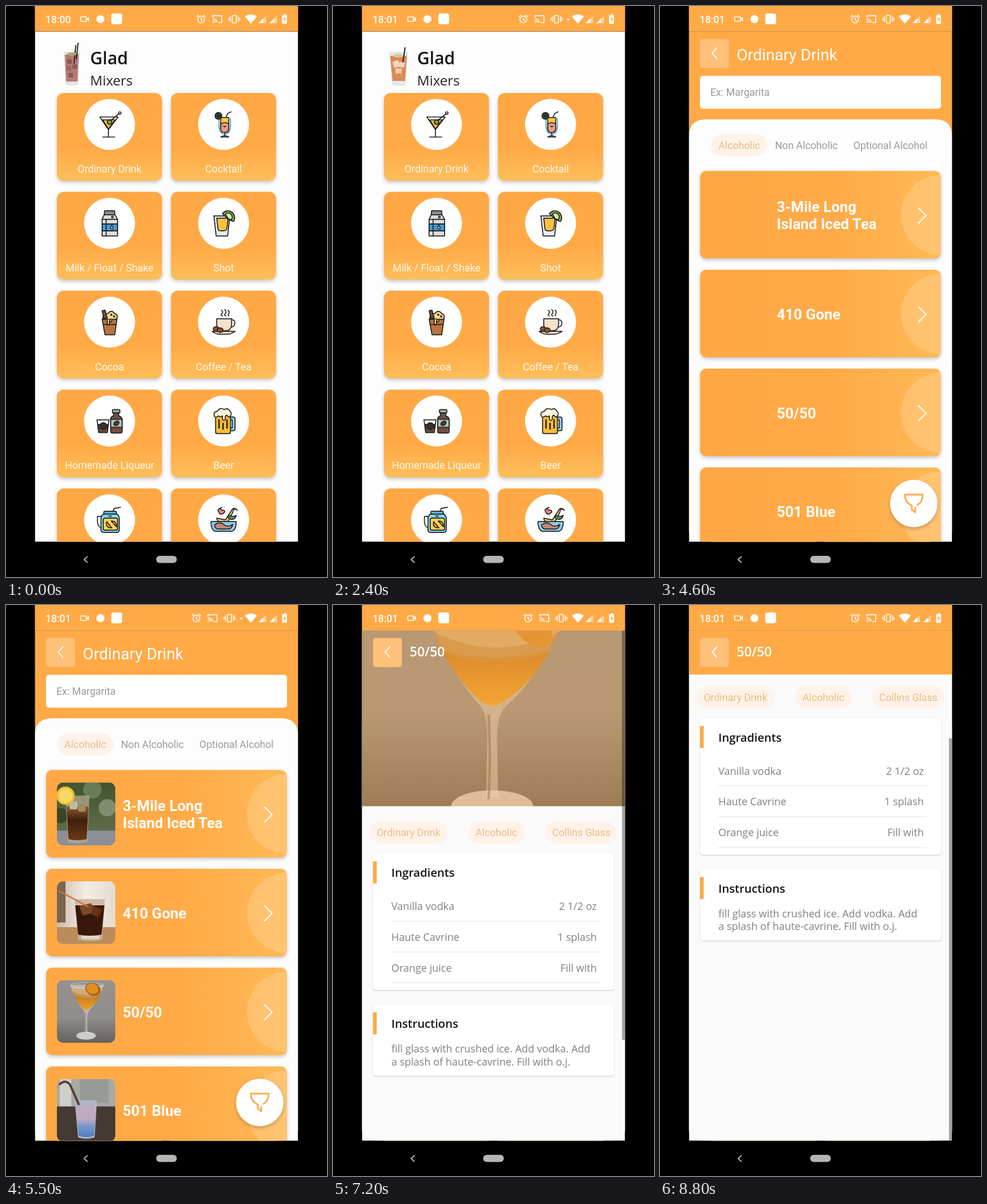
An HTML page for the animation above (9 s loop, 561x998 px).

```html
<!DOCTYPE html>
<html lang="en">
<head>
<meta charset="utf-8">
<title>Drinks app</title>
<style>
html, body { margin: 0; width: 100%; height: 100%; overflow: hidden; background: #000; }
svg { display: block; }
text { font-family: Roboto, sans-serif; font-size: 17.7px; white-space: pre; }
.soft text { font-family: "Open Sans", sans-serif; }
.soft .plain text { font-family: Roboto, sans-serif; }
.lift { filter: drop-shadow(0 3px 3px rgba(0,0,0,.22)); }
.flat { filter: drop-shadow(0 1px 1px rgba(0,0,0,.2)); }
.icon { stroke: #222; stroke-width: 1.7; stroke-linejoin: round; stroke-linecap: round; }
</style>
</head>
<body>
<svg id="stage" width="561" height="998" viewBox="0 0 561 998"></svg>
<script>
const ORANGE = '#ffaa47';
const LEFT = 50.5, TOP = 44.5, WIDE = 460, TALL = 892;
const $ = id => document.getElementById(id);

const rect = (x, y, w, h, fill, r = 0, more = '') =>
  `<rect x="${x}" y="${y}" width="${w}" height="${h}" rx="${r}" fill="${fill}" ${more}/>`;
const page = (fill, more) => rect(LEFT, TOP, WIDE, TALL, fill, 0, more);
const circle = (x, y, r, fill, more = '') =>
  `<circle cx="${x}" cy="${y}" r="${r}" fill="${fill}" ${more}/>`;
const oval = (x, y, rx, ry, fill, more = '') =>
  `<ellipse cx="${x}" cy="${y}" rx="${rx}" ry="${ry}" fill="${fill}" ${more}/>`;
const path = (d, fill = 'none', more = '') => `<path d="${d}" fill="${fill}" ${more}/>`;
const line = (d, color, w = 2) =>
  path(d, 'none', `stroke="${color}" stroke-width="${w}" stroke-linecap="round" stroke-linejoin="round"`);
const text = (x, y, s, fill, size = 17.7, more = '') =>
  `<text x="${x}" y="${y}" fill="${fill}" style="font-size:${size}px" ${more}>${s}</text>`;
const group = (id, body, more = '') => `<g id="${id}" ${more}>${body}</g>`;
const at = (x, y, body, more = '') => `<g transform="translate(${x} ${y})" ${more}>${body}</g>`;
const MID = 'text-anchor="middle"', END = 'text-anchor="end"', SEMI = 'font-weight="600"';

// Category icons, each centred on its disc
const icons = {
  'Ordinary Drink':
    path('M-17-13H15L-2 9Z', '#fff') + path('M-12-8H10L-2 8Z', '#fcc23c') +
    path('M-2 9V21M-12 22H9M-3-3L17-19') + circle(0, -4, 4, '#7d9b3c') + circle(18, -20, 2, '#fff'),
  'Cocktail':
    path('M-5-12H9V7Q9 14 2 14T-5 7Z', '#ffc83f') + path('M-5-1Q2-5 9-1V7Q9 14 2 14T-5 7Z', '#f09a83') +
    path('M9-10H12V6Q10 17 2 17T-8 6V-10H-5', 'none', 'stroke="#4f9fc0"') +
    path('M2 15V20M-5 22Q2 17 9 22Z', '#72c7ec') + path('M4-12L7-19L13-22') +
    circle(-9, -15, 6, '#39463a') + path('M-13-15H-5M-9-19V-11') + path('M0 3Q2 5 4 3'),
  'Milk / Float / Shake':
    path('M-13-7L-9-16H9L14-7V22H-13Z', '#dcdcdc') + rect(-9, -22, 18, 7, '#8c8c8c', 1) +
    rect(-13, 1, 27, 12, '#3f9ad6') + path('M-13-7H14M-6-7V22M-13 1H14M-13 13H14') +
    path('M4 3Q0 9 4 10T4 3', '#fff') + circle(5, -11, 1.5, '#fff'),
  'Shot':
    path('M-17-13H11L7 22H-13Z', '#e3eef8') + path('M-12-9H8L6 8Q5 13 0 13H-6Q-10 13-10 8Z', '#ffc13d') +
    path('M-2-17A11 11 0 0 1 17-3L8-7Z', '#7da94b') + path('M3-16A7 7 0 0 1 13-6L8-8Z', '#d8e89b'),
  'Cocoa':
    path('M-12-4Q-12-16-3-15Q3-23 9-15Q16-13 12-4Z', '#f9d486') +
    path('M-13-5H13L9 22H-8Z', '#b9743f') + path('M-4-5V4Q-1 7 0 2V-3Q2 2 4-3', '#f9d486') +
    path('M-10-6L-13-20L-8-21L-4-7Z', '#714b35') + path('M-11 4H11') +
    circle(3, -13, 1, '#222') + circle(8, -10, 1, '#222'),
  'Coffee / Tea':
    path('M12-4H16Q21-3 19 5Q17 9 10 9') + path('M-12-6H14V5Q12 15 5 15H-4Q-11 13-12 5Z', '#f5e0c9') +
    path('M-20 16H20Q13 21 7 21H-8Q-15 20-20 16Z', '#f5e0c9') +
    oval(-13, 12, 5, 4, '#94552e') + oval(-6, 14, 5, 4, '#94552e') +
    path('M-4-21Q0-18-3-15T-2-11M2-22Q6-18 3-15T4-11M8-21Q11-18 9-15T9-11'),
  'Homemade Liqueur':
    path('M-22-2H-1L-4 20H-19Z', '#fff') + path('M-20 6H-3L-4 20H-19Z', '#754c43') +
    circle(-11, 9, 6, '#39302e') + rect(5, -20, 13, 6, '#92b49f', 2) +
    path('M7-14V-9Q1-7 2-2V18Q2 21 5 21H18Q22 21 22 18V-2Q22-7 16-9V-14Z', '#754c43') +
    rect(2, -3, 20, 14, '#a9c8b4') + oval(12, 4, 5, 3.4, '#5b3a2a', 'transform="rotate(-35 12 4)"'),
  'Beer':
    path('M11-7H17Q20-7 20-3V13Q20 17 16 17H11V12H15V-2H11Z', '#84cef0') +
    path('M-14-10H12V19Q12 22 9 22H-11Q-14 22-14 19Z', '#fdbb38') +
    path('M-16-8Q-19-16-11-17Q-6-25 1-20Q8-24 11-17Q16-13 11-8Q10-5 8-8Q5-12 3-8V-3Q0 1-2-3V-9Q-6-6-9-9Q-14-5-16-8Z', '#fff3db') +
    path('M-8-2V12M-1 4V14M6-2V12', 'none', 'stroke-width="2.5"'),
  'Jar':
    path('M-15-6H-21Q-23 12-14 14') + path('M-11-10H13Q17-7 17-2V18Q16 22 12 22H-10Q-14 22-15 18V-2Q-15-7-11-10Z', '#83d2ef') +
    rect(-10, -15, 22, 5, '#5bb6de', 2) + path('M6-15L8-20L19-22') + rect(-11, -3, 25, 21, '#ffd256', 3) +
    path('M-5 3Q-8 14 4 14L-5 3M3 2Q13 2 12 12L3 2', '#f2a738') + path('M-1-7Q1-5 3-7'),
  'Punch':
    path('M-10-17Q-7-22-3-17Q2-18 2-14Q-3-8-7-11Z', '#ec8580') + path('M-7-20L-3-22', '#70a254') +
    path('M22-18Q17-21 16-13L6 6H-3Q-12 3-12-3L3 0L13-15Q17-24 24-17Z', '#f3c770') +
    path('M9-8Q18-4 22-8Q20 0 13-1T9-8Z', '#4d9f68') +
    path('M-22 3H22Q22 20 12 20H-12Q-22 20-22 3Z', '#88cfea') + path('M-16 9Q-7 2 0 8T16 8Q14 16 8 16H-9Q-15 16-16 9Z', '#c98678')
};

const homeCard = (name, i) => {
  const label = i > 7 ? '' : text(92, 139, name, '#fff8ee', 17.8, MID);
  return at(89 + i % 2 * 199.3, 152 + (i >> 1) * 172.8,
    rect(0, 0, 183.7, 153.5, 'url(#down)', 12, 'class="lift"') +
    circle(92, 55, 44.6, '#fff') + at(92, 55, icons[name], 'class="icon"') + label);
};

const logos = [
  path('M101 80L104 137Q115 141 126 137L129 80Z', '#e7e3e3') + path('M103 85L105 132H125L127 84Z', '#b87872') +
  line('M122 69L119 100M126 65L123 92', '#252020', 2) + rect(107, 93, 8, 8, '#875b55', 1) +
  rect(116, 102, 8, 8, '#875b55', 1) + rect(106, 105, 8, 8, '#9b6861', 1) + rect(109, 117, 8, 8, '#875b55', 1) + oval(115, 84, 8, 3, '#a8ad72'),
  path('M98 80H131L127 138Q115 141 103 138Z', '#e5e6ea') + path('M100 87H129L126 131H104Z', '#db8b55') +
  line('M126 73L122 98', '#202020', 2) + oval(114, 87, 9, 3, '#d8c994') + rect(105, 96, 11, 11, '#f1d6c2', 1, 'transform="rotate(-18 110 101)"') +
  rect(116, 98, 9, 9, '#f1d6c2', 1, 'transform="rotate(14 120 102)"') + rect(109, 109, 11, 9, '#efcbb0', 1),
  path('M94 84H134L130 140H98Z', '#dfe3e9') + path('M97 88H131L129 97H99Z', '#d5cfca') + path('M99 98H129L126 129H102Z', '#de902d')
].map((body, i) => group('logo' + i, body)).join('');

const home = page('#fdfdfe') + logos +
  `<g class="soft">${text(147, 102, 'Glad', '#151515', 30, SEMI) + text(147, 138.5, 'Mixers', '#252525', 24)}</g>` +
  Object.keys(icons).map(homeCard).join('');

const backButton = rect(70, 57.5, 50.5, 51, '#ffc07a', 5) + line('M99.5 73L91 82.5L99.5 92', '#fff', 1.8);

// Coupe drawn in thumbnail space, reused large on the detail page
const coupe =
  path('M23 8Q35 40 46 52Q49 56 49 66L48.5 93H53.5L53 66Q53 56 57 52Q72 38 82 8Z', '#e9e4dc', 'fill-opacity=".5"') +
  path('M30 27Q52 34 75 27Q67 43 56 50Q51 54 46 50Q36 40 30 27Z', 'url(#juice)') +
  path('M27 19Q52 33 79 19L75 28Q52 37 30 28Z', '#c98a3c', 'fill-opacity=".8"') +
  path('M25 13Q52 20 80 13L79 19Q52 33 27 19Z', '#d9a860', 'fill-opacity=".75"') +
  oval(52.5, 9, 29.5, 5, 'none', 'stroke="#eee" stroke-opacity=".6" stroke-width=".8"') +
  oval(51, 97, 17, 7, '#eeeae6', 'fill-opacity=".75"') +
  path('M49.5 56Q50.5 76 49.5 94', 'none', 'stroke="#5d554e" stroke-opacity=".5" stroke-width="1.1"');

const photos = [
  rect(0, 0, 102, 110, 'url(#leaf)') + circle(62, 12, 16, '#8a9a78', 'opacity=".55"') + circle(88, 44, 15, '#b4b8a6', 'opacity=".5"') +
  circle(6, 58, 13, '#2b3a20', 'opacity=".7"') + rect(0, 84, 102, 26, '#8d8f97') +
  path('M15 23H57L53 104Q36 108 19 104Z', '#b5ae97', 'fill-opacity=".7"') +
  path('M17 42H55L52 99Q36 103 20 99Z', 'url(#tea)') + rect(22, 33, 14, 14, '#c1b8a0', 3) + rect(37, 37, 13, 14, '#a58c68', 3) +
  circle(15, 23, 16, '#f4c12f') + circle(15, 23, 12, '#f8d968'),
  rect(0, 0, 102, 110, 'url(#room)') + rect(0, 0, 15, 72, '#7a6552') + rect(0, 80, 102, 30, '#bb8b5b') +
  path('M31 31H84L79 102Q57 107 37 102Z', '#c9b29f', 'fill-opacity=".85"') + path('M32 42H83L78 93Q57 97 37 93Z', '#3a170b') +
  path('M39 43L60 38L66 54L45 60Z', '#7d4827') + path('M63 42L79 50L72 63L60 57Z', '#673117') +
  path('M42 95H75L74 101H43Z', '#e3d4c6') + line('M4 17L54 44', '#c8764c', 2.5),
  rect(0, 0, 102, 110, 'url(#wall)') + coupe + oval(63, 16, 14, 11, '#a8621a', 'transform="rotate(25 63 16)"') +
  oval(62, 15, 11, 9, '#e08f25', 'transform="rotate(25 62 15)"'),
  rect(0, 0, 102, 110, '#a8aaa6') + rect(5, 0, 20, 50, '#cfd0cc') + rect(40, 0, 50, 42, '#979b96') + rect(0, 48, 102, 62, '#443a34') +
  path('M31 37H70L66 102Q51 107 37 102Z', '#aeb3c4') + path('M33 44H69L65 99Q51 104 38 99Z', 'url(#blue)') + line('M5 9Q15 0 23 10L38 44', '#5a3e37', 4)
];

const names = [['3-Mile Long', 'Island Iced Tea'], ['410 Gone'], ['50/50'], ['501 Blue']];
const listCard = (lines, i) => at(70, 288.3 + i * 172.7,
  rect(0, 0, 421, 153, 'url(#across)', 11, 'class="lift"') +
  path('M421 7A70 70 0 0 0 421 147Z', '#fff', 'fill-opacity=".16"') + line('M382 65L395 78L382 91', '#fff', 2) +
  group('photo' + i, at(19, 22, photos[i], 'clip-path="url(#thumb)"')) +
  lines.map((s, k) => text(134, (lines.length > 1 ? 72 : 87) + k * 30, s, '#fff', 25.8, 'font-weight="700"')).join(''));

const chip = (x, y, w, s) => rect(x, y, w, 39, '#fff2e8', 19.5) + text(x + w / 2, y + 26, s, '#e9bd86', 17.7, MID);

const list = page(ORANGE) + backButton + text(134, 95, 'Ordinary Drink', '#fff', 28) +
  rect(70, 122, 421, 57.5, '#fff', 5) + text(88, 157, 'Ex: Margarita', '#999') +
  path('M50.5 940V228Q50.5 198 81 198H480Q510.5 198 510.5 228V940Z', '#fdfdfe') +
  chip(89, 224, 99, 'Alcoholic') + text(201, 250, 'Non Alcoholic', '#9b9b9b') + text(338, 250, 'Optional Alcohol', '#9b9b9b') +
  group('items', names.map(listCard).join('')) +
  group('refresh', circle(0, 0, 20, '#fcfcfc', 'class="lift"') + group('refreshArc', line('M0-9A9 9 0 1 1-9 0', ORANGE, 2.5))) +
  circle(443.5, 869.5, 41.5, '#fff', 'class="lift"') +
  line('M450 872Q459 867 459 854H428Q428 868 440 873V880L446 885V877', ORANGE, 2.8);

const panel = (id, title) => group(id,
  rect(70, 0, 421, 78, '#fff', 5, `id="${id}Box" class="flat"`) + rect(70, 14, 6.5, 38.5, ORANGE) +
  text(102, 41, title, '#161616', 20.2, SEMI));

const rows = [['Vanilla vodka', '2 1/2 oz'], ['Haute Cavrine', '1 splash'], ['Orange juice', 'Fill with']].map(([a, b], i) => {
  const y = 533 + i * 53.8;
  return text(102, y, a, '#808080', 18) + text(461, y, b, '#808080', 18, END) + rect(102, y + 19, 364, 1.2, '#e6e6e6');
}).join('');

const chips = chip(64, 378, 136, 'Ordinary Drink') + chip(236, 378, 99, 'Alcoholic') + chip(371, 378, 126, 'Collins Glass');

const detail = page('#fafafa') +
  group('body',
    panel('ingr', 'Ingradients') + panel('instr', 'Instructions') +
    group('loaded', `<g class="plain">${chips}</g>` + rows +
      text(102, 782, 'fill glass with crushed ice. Add vodka. Add', '#808080', 18) +
      text(102, 804.5, 'a splash of haute-cavrine. Fill with o.j.', '#808080', 18)) +
    group('wait', path('M6.5-17.5A18.7 18.7 0 0 1 17.3-7', 'none', `stroke="${ORANGE}" stroke-width="4"`)), 'class="soft"') +
  rect(LEFT, TOP, WIDE, 307, ORANGE, 0, 'id="bar"') +
  `<g clip-path="url(#barClip)">${group('hero', rect(LEFT, -60, WIDE, 420, 'url(#wall)') +
    `<g transform="translate(64 -27) scale(4.2 3.9)">${coupe}</g>` + path('M318 45Q340 74 366 74Q384 66 383 45Z', '#d98a2b'))}</g>` +
  backButton + `<g class="soft">${text(134, 89.5, '50/50', '#fff', 23, 'id="name" ' + SEMI)}</g>` +
  rect(505, 45, 5.5, 715, '#000', 0, 'id="thumbBar" fill-opacity=".34"');

const W = 'stroke="#fff" stroke-width="1.6" fill="none"';
const status = rect(LEFT, 0, WIDE, TOP, ORANGE) + text(69, 29.5, '', '#fff', 17.5, 'id="clock" font-weight="500"') +
  rect(130.5, 19, 10, 8, 'none', 1, W) + path('M141 22L145 19V27L141 24Z', '#fff') +
  circle(165, 23, 7, '#fff') + rect(184, 13, 19, 19, '#fff', 4) +
  group('tray',
    circle(341, 23.5, 6, 'none', W) + path('M341 20V24L344 26M333 19L337 15.5M349 19L345 15.5', 'none', W) +
    path('M361.5 20V17H377V29H371M361 28.5H363M361 25Q365 25 366 29M361 22Q368 22 369 29', 'none', W) +
    rect(395.5, 16.5, 7, 13, 'none', 1, W) + path('M392 18V28M389.5 20.5V25.5M406 18V28M408.5 20.5V25.5', 'none', W)) +
  group('arrow', path('M408.5 22H414L411.2 26Z', '#fff')) +
  path('M417.5 18.5Q428 11 438.5 18.5L428 31Z', '#fff') +
  [441.5, 460.5].map(x => path(`M${x} 30H${x + 13}V17Z`, '#fff', 'fill-opacity=".45"') + path(`M${x} 30H${x + 8}V22Z`, '#fff')).join('') +
  path('M484.5 16H486V14H489V16H491V31H482.5V16Z', '#fff') + path('M487.5 18L484.5 24H487V29L489.5 22.5H487.5Z', ORANGE);

const gradient = (id, dir, ...stops) => `<linearGradient id="${id}" x1="0" y1="0" ${dir}>` +
  stops.map(([o, c]) => `<stop offset="${o}" stop-color="${c}"/>`).join('') + '</linearGradient>';
const DOWN = 'x2="0" y2="1"', ACROSS = 'x2="1" y2="0"';
const clip = (id, x, y, w, h, r = 0) => `<clipPath id="${id}">${rect(x, y, w, h, '#000', r, `id="${id}Rect"`)}</clipPath>`;

$('stage').innerHTML = '<defs>' +
  gradient('down', DOWN, [0, '#ffa845'], [.62, '#ffaa47'], [1, '#ffbe5a']) +
  gradient('across', ACROSS, [0, '#ffa845'], [.55, '#ffaa47'], [1, '#ffb956']) +
  gradient('leaf', DOWN, [0, '#40542f'], [.75, '#5e6b4a']) +
  gradient('wall', DOWN, [0, '#94918f'], [.6, '#918d8a'], [1, '#65605d']) +
  gradient('room', ACROSS, [0, '#cdbba6'], [.5, '#f2eee7'], [1, '#e4dbd0']) +
  gradient('tea', DOWN, [0, '#8a5a2c'], [.4, '#41200d'], [1, '#6b3a18']) +
  gradient('blue', DOWN, [0, '#b9aec4'], [.45, '#c3a9bd'], [.65, '#7c98cf'], [1, '#4a7fc4']) +
  gradient('juice', DOWN, [0, '#c9781d'], [1, '#eba32a']) +
  clip('screen', LEFT, TOP, WIDE, TALL) + clip('listClip', LEFT, TOP, WIDE, TALL) + clip('detailClip', LEFT, TOP, WIDE, TALL) +
  clip('barClip', LEFT, TOP, WIDE, 307) + clip('thumb', 0, 0, 102, 109.5, 11) + '</defs>' +
  rect(0, 0, 561, 998, '#000') +
  `<g clip-path="url(#screen)">` + group('home', home) + page('#000', 'id="homeDim"') +
  `<g id="listWrap" clip-path="url(#listClip)">${group('list', list)}${page('#000', 'id="listDim"')}</g>` +
  `<g id="detailWrap" clip-path="url(#detailClip)">${group('detail', detail)}</g></g>` +
  status + line('M142 962.5L136.5 967.5L142 972.5', '#b9b9b9', 1.8) + rect(262.5, 961, 36, 12.5, '#b5b5b5', 6.2);

const clamp = v => Math.min(1, Math.max(0, v));
const ramp = (t, from, to) => clamp((t - from) / (to - from));
const out = x => 1 - (1 - x) ** 2;
const smooth = x => x * x * (3 - 2 * x);

// cubic-bezier(.4, 0, .2, 1)
function glide(x) {
  let lo = 0, hi = 1, u = .5;
  for (let i = 0; i < 22; i++) {
    u = (lo + hi) / 2;
    const bx = 1.2 * (1 - u) ** 2 * u + .6 * (1 - u) * u * u + u ** 3;
    if (bx < x) lo = u; else hi = u;
  }
  return 3 * (1 - u) * u * u + u ** 3;
}

const set = (id, k, v) => $(id).setAttribute(k, v);
const move = (id, x, y) => set(id, 'transform', `translate(${x} ${y})`);
const show = (id, on) => set(id, 'display', on ? 'inline' : 'none');
const fade = (id, v) => set(id, 'opacity', v);

// The page below slides up and dims
function leave(p, old, dim) {
  move(old, 0, -17.8 * p);
  fade(dim, .1 * clamp(p * 1.6));
}

// The new page is uncovered from below as it rises
function enter(p, next) {
  show(next + 'Wrap', p > 0);
  set(next + 'ClipRect', 'y', TOP + TALL * (1 - p));
  move(next, 0, 36.5 * (1 - p));
}

const LOGO_STEPS = [[0, 0], [1000, 2], [1900, 1], [3000, 2]];
const OPEN_LIST = 3450, OPEN_DETAIL = 6484, SLIDE = 425, LOAD = 7000;

function draw(t) {
  $('clock').textContent = t < 1400 ? '18:00' : '18:01';
  const narrow = (t >= 2000 && t < 3000) || (t >= 4900 && t < 6200);
  move('tray', narrow ? -8.3 : 0, 0);
  show('arrow', narrow);

  const logo = LOGO_STEPS.filter(s => s[0] <= t).pop()[1];
  for (let i = 0; i < 3; i++) show('logo' + i, i === logo);

  const toList = glide(ramp(t, OPEN_LIST, OPEN_LIST + SLIDE));
  const toDetail = glide(ramp(t, OPEN_DETAIL, OPEN_DETAIL + SLIDE));
  leave(toList, 'home', 'homeDim');
  enter(t < OPEN_LIST ? 0 : toList, 'list');
  if (t >= OPEN_DETAIL) leave(toDetail, 'list', 'listDim');
  else fade('listDim', 0);
  enter(t < OPEN_DETAIL ? 0 : toDetail, 'detail');

  const spin = out(ramp(t, 3630, 3850)) * (1 - ramp(t, 4400, 4550));
  set('refresh', 'transform', `translate(280.5 343) scale(${spin})`);
  set('refreshArc', 'transform', `rotate(${t * .45})`);
  fade('refreshArc', ramp(t, 3750, 3900));
  show('items', t >= 4500);
  for (let i = 0; i < 4; i++) fade('photo' + i, ramp(t, 4700 + i * 120, 4950 + i * 120));

  const ready = t >= LOAD;
  show('loaded', ready);
  show('name', ready);
  show('wait', !ready);
  set('wait', 'transform', `translate(280.5 377) rotate(${(t - 6700) * .5})`);
  move('ingr', 0, ready ? 434 : 428.5);
  move('instr', 0, ready ? 698 : 531);
  set('ingrBox', 'height', ready ? 239 : 77.5);
  set('instrBox', 'height', ready ? 125 : 77.5);

  const s = 236.5 * smooth(ramp(t, 8030, 8750));
  const barH = Math.max(77, 307 - s);
  move('body', 0, -s);
  set('bar', 'height', barH);
  set('barClipRect', 'height', barH);
  move('hero', 0, -s * .5);
  fade('hero', out(ramp(t, LOAD, 7500)) * (1 - ramp(t, 8350, 8700)));
  set('thumbBar', 'y', 45 + s * .795);
}

const t0 = performance.now();
(function tick() {
  draw((performance.now() - t0) % 9000);
  requestAnimationFrame(tick);
})();
</script>
</body>
</html>
```
